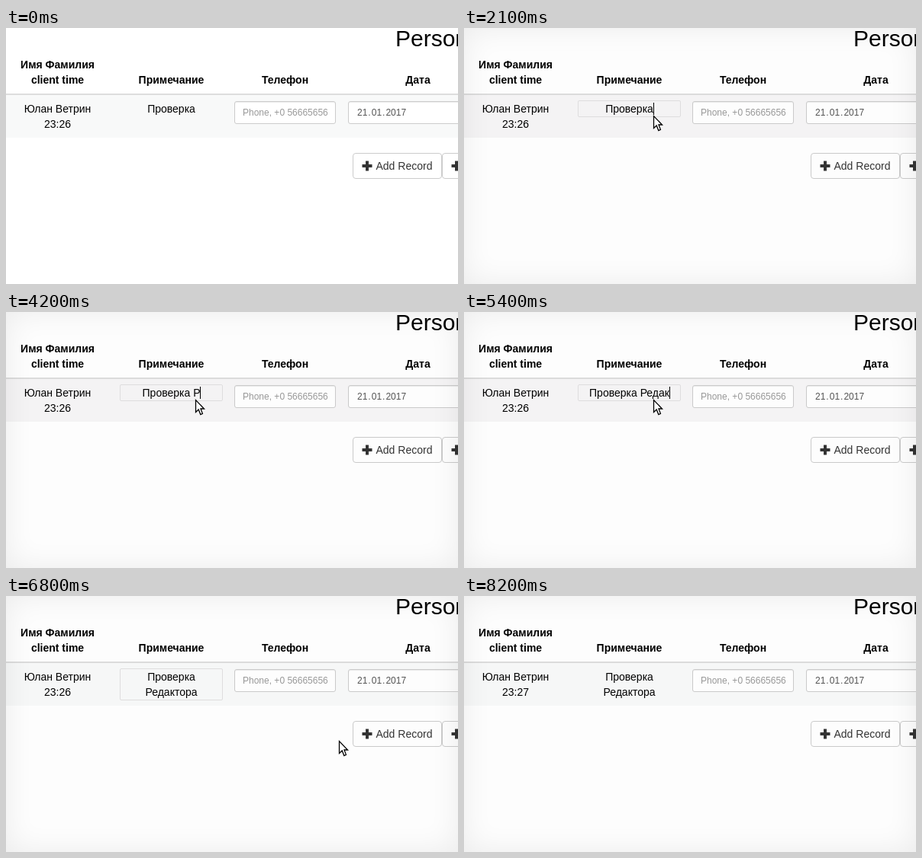
Animation, 592 px wide and 336 px high, one loop 8300 ms. Source, as an HTML page:

```html
<!DOCTYPE html>
<html lang="ru">
<head>
<meta charset="utf-8">
<title>Inline table editing</title>
<style>
  html, body { margin: 0; width: 100%; height: 100%; overflow: hidden; background: #fff; }
  #stage {
    position: relative; width: 592px; height: 336px; overflow: hidden;
    font: 14px/20px "Liberation Sans", Arial, sans-serif; color: #000;
  }
  #stage * { box-sizing: border-box; }
  #stage > * { position: absolute; }
  h1 { left: 510px; top: -3px; margin: 0; font-size: 30px; line-height: 33px; font-weight: 400; }
  .cell { width: 135px; text-align: center; }
  .head { font-weight: 700; }
  .c1 { left: 0; }
  .c2 { left: 149px; }
  .c3 { left: 298px; }
  .c4 { left: 472px; }
  #rule { left: 0; top: 86px; width: 592px; height: 2px; background: #ddd; }
  #row { left: 0; top: 88px; width: 592px; height: 56px; }
  #note { top: 95px; border: 1px solid transparent; border-radius: 2px; white-space: pre-wrap; }
  #note.editing { border-color: #e0dfe0; }
  #caret {
    display: inline-block; width: 1px; height: 16px; margin-right: -1px;
    vertical-align: -3px; background: #000;
  }
  .field {
    top: 96px; height: 30px; padding: 5px 10px; overflow: hidden; white-space: nowrap;
    font-size: 12px; line-height: 18px; background: #fff; border: 1px solid #ccc;
    border-radius: 3px; box-shadow: inset 0 1px 1px rgba(0, 0, 0, .075);
  }
  #phone { left: 299px; width: 133px; color: #999; }
  #phone span { display: block; overflow: hidden; }
  #date { left: 448px; width: 180px; color: #555; }
  #date span { padding: 0 1px; }
  .button {
    top: 164px; width: 117px; height: 34px; padding: 6px 0 0 29.5px; white-space: nowrap;
    color: #333; background: #fff; border: 1px solid #ccc; border-radius: 4px;
  }
  .button svg { position: absolute; left: 11px; top: 9px; }
  .button path { stroke: #333; stroke-width: 4; stroke-linecap: square; }
  #vignette {
    inset: 0; background: rgba(0, 0, 0, .006);
    box-shadow: inset 0 0 38px rgba(0, 0, 0, .075);
  }
  #pointer { left: 0; top: 0; overflow: visible; }
</style>
</head>
<body>
<div id="stage">
  <h1>Person</h1>
  <div class="cell head c1" style="top:38px">Имя Фамилия<br>client time</div>
  <div class="cell head c2" style="top:58px">Примечание</div>
  <div class="cell head c3" style="top:58px">Телефон</div>
  <div class="cell head c4" style="top:58px">Дата</div>
  <div id="rule"></div>
  <div id="row"></div>
  <div class="cell c1" style="top:96px">Юлан Ветрин<br><span id="clock"></span></div>
  <div id="note" class="cell c2"><span id="text"></span><span id="caret"></span></div>
  <div id="phone" class="field"><span>Phone, +0 56665656</span></div>
  <div id="date" class="field"><span>21</span>.<span>01</span>.<span>2017</span></div>
  <div class="button" style="left:454px">
    <svg width="14" height="14"><path d="M7 2.5v9M2.5 7h9"/></svg>Add Record
  </div>
  <div class="button" style="left:571px">
    <svg width="14" height="14"><path d="M7 2.5v9M2.5 7h9"/></svg>Add Record
  </div>
  <div id="vignette"></div>
  <svg id="pointer" width="20" height="24">
    <path id="arrow" d="M.5 .5V16.5L4.2 13L6.8 19.5L9.4 18.3L7 12H11.5Z" fill="#fff" stroke="#000" stroke-width="1.3"/>
    <g id="beam" fill="none" transform="translate(.5 .5)">
      <path d="M-3.5 -7H3.5M-3.5 7H3.5M0 -7V7" stroke="#000" stroke-width="3"/>
      <path d="M-2.5 -7H2.5M-2.5 7H2.5M0 -7V7" stroke="#fff"/>
    </g>
  </svg>
</div>
<script>
  const LOOP = 8300, STEP = 100;
  const FOCUS = 2100, BLUR = 7700;
  const BASE = "Проверка", TYPED = " Редактора";
  const KEY_TIMES = [2650, 4100, 4400, 4700, 5000, 5300, 5600, 5800, 6000, 6250];
  // Pointer waypoints: time, x, y
  const PATH = [
    [300, 455, 236], [1000, 263, 115], [1800, 263, 115], [2100, 248, 115],
    [6300, 248, 115], [6800, 436, 190], [7400, 440, 236]
  ];
  const el = id => document.getElementById(id);
  const show = (id, visible) => { el(id).style.display = visible ? "" : "none"; };

  function pointerAt(t) {
    const next = PATH.findIndex(p => p[0] > t);
    if (next < 1) return next ? PATH[PATH.length - 1].slice(1) : PATH[0].slice(1);
    const a = PATH[next - 1], b = PATH[next];
    const k = (t - a[0]) / (b[0] - a[0]), eased = k * k * (3 - 2 * k);
    return [1, 2].map(i => Math.round(a[i] + (b[i] - a[i]) * eased));
  }

  function render(t) {
    const editing = t >= FOCUS && t < BLUR;
    const pressed = KEY_TIMES.filter(time => time <= t);
    const lastKey = pressed.length ? pressed[pressed.length - 1] : FOCUS;
    const note = BASE + TYPED.slice(0, pressed.length);
    el("text").textContent = note.replace(/ $/, "\u00a0");
    el("note").classList.toggle("editing", editing);
    show("caret", editing && (t - lastKey) % 1000 < 500);
    el("clock").textContent = t < BLUR ? "23:26" : "23:27";

    const [x, y] = pointerAt(t);
    const visible = t >= 300 && t < 8000;
    const hovered = visible && y >= 88 && y < 144;
    const overText = t >= 1000 && t < FOCUS;
    el("row").style.background = hovered ? "#f6f5f6" : "#f8f9f9";
    el("pointer").style.transform = `translate(${x}px, ${y}px)`;
    show("pointer", visible);
    show("arrow", !overText);
    show("beam", overText);
    show("vignette", t >= STEP);
  }

  const start = performance.now();
  function frame() {
    const t = (performance.now() - start) % LOOP;
    render(Math.floor(t / STEP) * STEP);
    requestAnimationFrame(frame);
  }
  frame();
</script>
</body>
</html>
```
